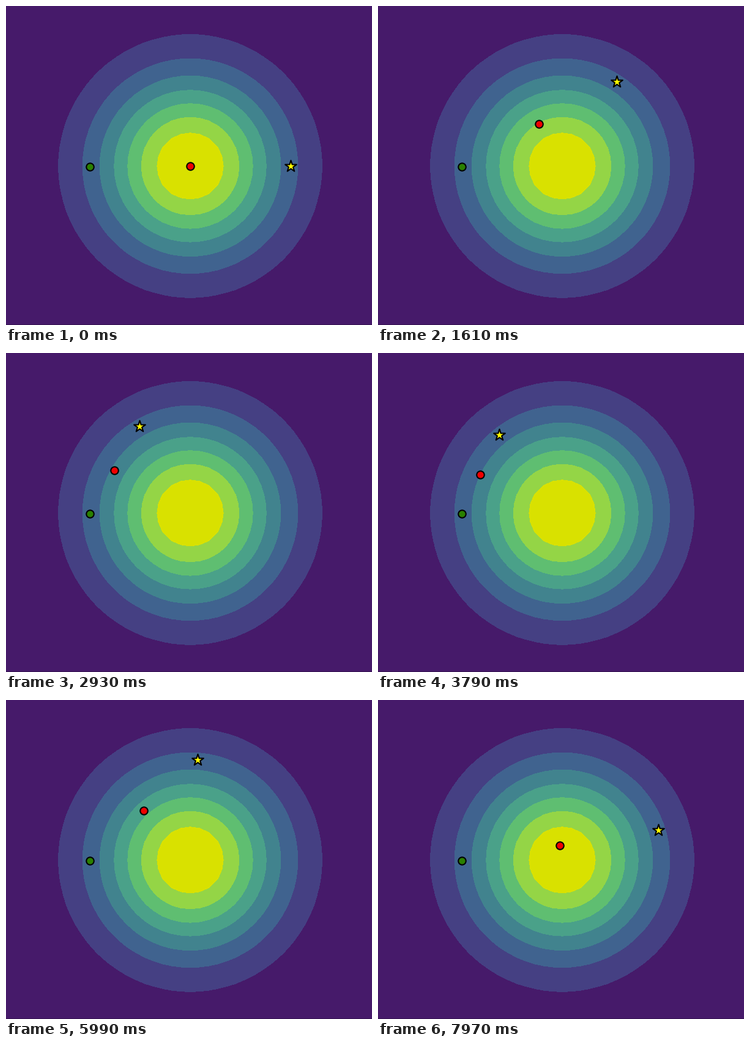
A matplotlib script that plays this animation: 598 by 522 pixels, repeating every 8000 ms.

```python
import numpy as np
import matplotlib.pyplot as plt
from matplotlib.animation import FuncAnimation

W, H, DPI = 598, 522, 100
LOOP, STEP = 8000, 20
UNIT = 149.1                     # px per data unit
ORBIT, TICK = 1.1 * UNIT, 0.05   # orbit radius in px, angle unit in radians
CENTER = np.array([300.95, 260.3])
GREEN = np.array([136.75, 259.05])

BANDS = ["#461a6a", "#454083", "#40638f", "#41838e",
         "#4aa189", "#5fbe71", "#94d546", "#d9e100"]

# Key points of the hand-dragged angle: (ms, ticks)
DRAG = [(365, 0), (1180, 11.8), (1960, 25.8), (2930, 41.6), (3300, 42.4),
        (3790, 44.6), (4605, 45), (4920, 41.4), (5660, 35.2), (5990, 30.4),
        (6520, 23.4), (6940, 20.4), (7970, 6.4)]


def star_at(t):
    # The drag glides between key points but snaps to whole ticks.
    a = TICK * np.round(np.interp(t, *zip(*DRAG)))
    return CENTER + ORBIT * np.array([np.cos(a), np.sin(a)])


fig = plt.figure(figsize=(W / DPI, H / DPI), dpi=DPI, facecolor=BANDS[0])
ax = fig.add_axes([0, 0, 1, 1])
ax.axis("off")

# Gaussian hill on a coarse grid
grid = np.linspace(-2.1, 2.1, 43)
x, y = np.meshgrid(grid, grid)
ax.contourf(301 + UNIT * x, 260.1 + UNIT * y, np.exp(-x**2 - y**2),
            levels=np.arange(9) / 8, colors=BANDS, antialiased=False)
ax.axhspan(0, 1, color="#351451", lw=0)
ax.set_xlim(0, W)
ax.set_ylim(0, H)


def dot(pos, color, size=80, marker="o"):
    return ax.scatter(*pos, s=size, c=color, marker=marker,
                      edgecolors="black", linewidths=1.5, zorder=3)


dot(GREEN, "#2a8000")
red = dot((GREEN + star_at(0)) / 2, "#f00000")
star = dot(star_at(0), "#ffff00", 200, "*")


def update(i):
    pos = star_at(i * STEP + STEP / 2)
    star.set_offsets([pos])
    red.set_offsets([(pos + GREEN) / 2])
    return red, star


anim = FuncAnimation(fig, update, frames=LOOP // STEP, interval=STEP,
                     repeat=True, repeat_delay=0, blit=False)
plt.show()
```
